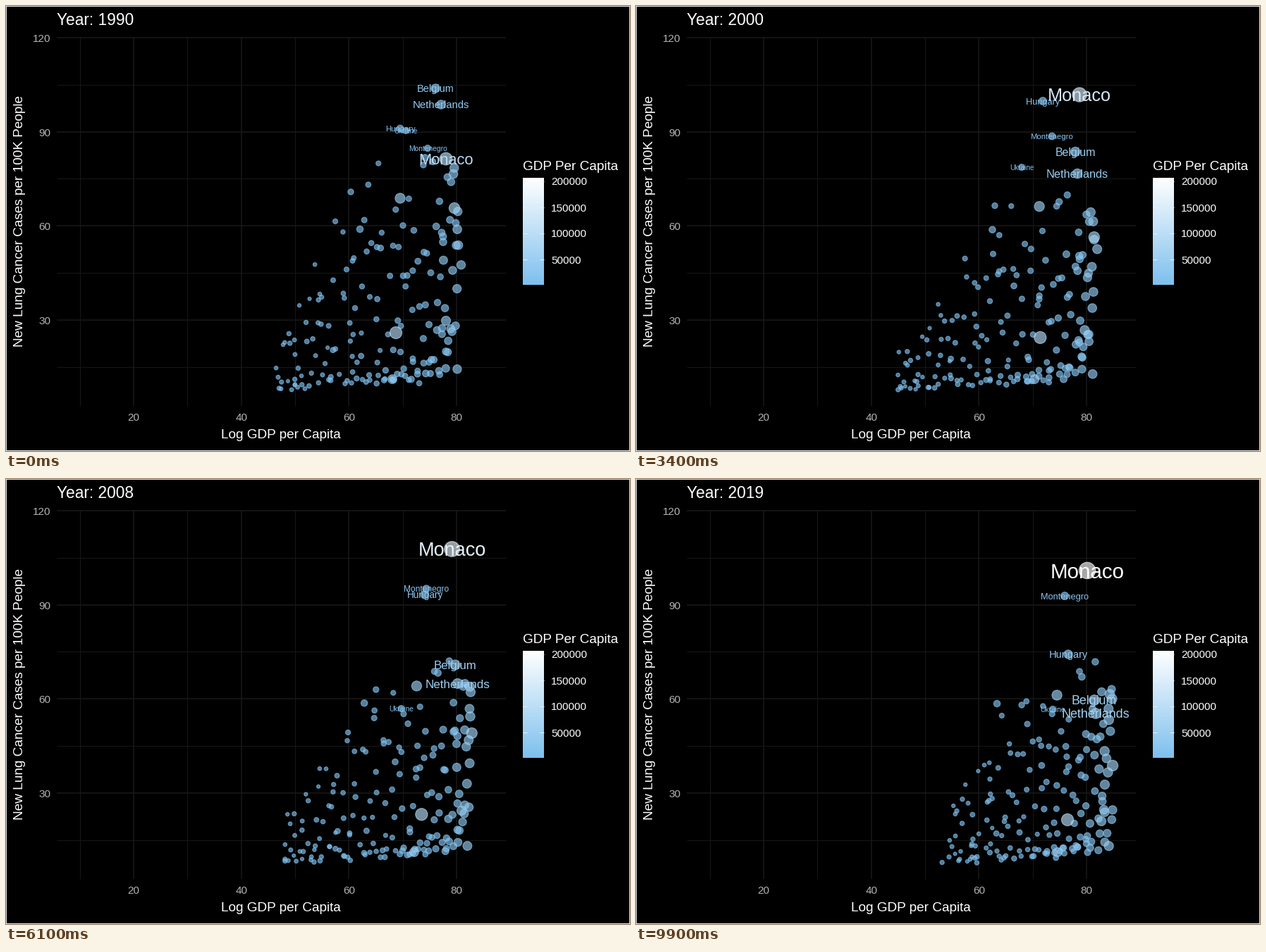
A matplotlib script that plays this animation: 885x632 px, repeating every 10000 ms.

```python
import numpy as np
import matplotlib.pyplot as plt
from matplotlib.animation import FuncAnimation
from matplotlib.patches import Rectangle

W, H, DPI = 885, 632, 100
FRAMES, YEARS, CROWD = 100, 30, 172
PT = 72 / DPI
SKY = np.array([0x7E, 0xC0, 0xEE]) / 255
T = np.arange(FRAMES)
PART = T / (FRAMES - 1)
STATES = np.linspace(0, FRAMES - 1, YEARS)

plt.rcParams["font.family"] = "Liberation Sans"
rng = np.random.default_rng(11)

# Named bubbles: first and last size, then x and y at each key time
KEYS = [0, 20, 34, 49, 73, 99]
LABELS = {
    "Belgium": (2.95, 3.6, [609, 618, 623, 632, 642, 650],
                [117, 170, 207, 255, 273, 314]),
    "Hungary": (2.3, 2.95, [559, 569, 577, 586, 602, 613],
                [174, 150, 135, 135, 194, 249]),
    "Monaco": (4.46, 6, [624, 628, 629, 632, 633, 640],
               [217, 206, 126, 94, 105, 130]),
    "Montenegro": (2.1, 2.6, [598, 593, 590, 592, 600, 608],
                   [202, 191, 185, 145, 167, 166]),
    "Netherlands": (3.02, 3.64, [617, 622, 626, 633, 648, 652],
                    [140, 182, 238, 285, 296, 333]),
    "Ukraine": (2, 2.1, [567, 542, 547, 547, 574, 591],
                [177, 163, 229, 292, 360, 327]),
}

# Bubbles that stand apart: size, first x and y, last x and y
LONERS = [
    (3.5, 559, 273, 597, 307),
    (4.3, 553, 464, 612, 484),
    (3.8, 636, 287, 676, 407),
    (3.2, 624, 447, 660, 486),
    (3.1, 548, 530, 598, 530),
    (1.9, 489, 264, 547, 321),
    (2.2, 502, 317, 512, 319),
]


def wander(step):
    """Random drift, straight from one year to the next."""
    walk = np.cumsum(rng.normal(0, step, YEARS))
    return np.interp(T, STATES, walk - walk.mean())


def crowd():
    """Countries by income rank: richer ones lie further right and reach
    higher rates; the whole fan slides right and flattens over the years."""
    spread = [0, 34, 73, 99]
    left = np.interp(T, spread, [384, 368, 402, 440])
    right = np.interp(T, spread, [640, 650, 663, 674])
    peak = np.interp(T, spread, [165, 235, 235, 250])
    drop = 280 - 95 * PART
    for k in range(CROWD):
        rank = (k + 0.5) / CROWD
        reach = 1 - (1 - rank) ** 1.3
        top = peak + drop * abs(1 - reach / 0.75) ** 1.2
        bottom = 544 - 14 * reach
        level = (k * 0.618 + rng.normal(0, 0.12)) % 1
        level **= 2.2 - 1.6 * rank ** 4
        size = 1.15 + 0.95 * rank + rank ** 6 + rng.normal(0, 0.13)
        x = left + (right - left) * reach + wander(1.4)
        y = bottom + (top - bottom) * level + wander(1 + 2 * level)
        yield x, np.minimum(y, 545), max(size, 1) + 0.3 * rank ** 4 * PART


def build_tracks():
    rows = list(crowd())
    for size, x0, y0, x1, y1 in LONERS:
        rows.append((x0 + (x1 - x0) * PART, y0 + (y1 - y0) * PART,
                     np.full(FRAMES, size)))
    for s0, s1, xs, ys in LABELS.values():
        rows.append((np.interp(T, KEYS, xs), np.interp(T, KEYS, ys),
                     s0 + (s1 - s0) * PART ** 0.75))
    return np.array(rows).transpose(2, 0, 1)


def shade(size):
    """Sky blue to white by GDP, which goes with the square of the size."""
    t = np.clip((np.asarray(size) - 1) / 5, 0, 1)[..., None] ** 2
    return SKY + (1 - SKY) * t


def diameter(size):
    return 3.685 * size + 1.224


def write(x, y, text, px, color="white", **kw):
    return ax.text(x, y, text, fontsize=px * PT, color=color, **kw)


def px_x(v):
    return 181 + (v - 20) * 7.633


def px_y(v):
    return 446 - (v - 30) * 4.456


def rule(xs, ys, width, color):
    ax.plot(xs, ys, color=color, lw=width * PT, zorder=1,
            solid_capstyle="butt")


fig = plt.figure(figsize=(W / DPI, H / DPI), dpi=DPI, facecolor="black")
ax = fig.add_axes([0, 0, 1, 1])
ax.axis("off")

# Grid and axis labels, every second line a major one
for k in range(1, 9):
    major = k % 2 == 0
    width = 1.7 if major else 1
    x, y = px_x(10 * k), px_y(15 * k)
    if x < 709:
        rule([x, x], [44, 568], width, "#171717")
    rule([72, 709], [y, y], width, "#171717")
    if major:
        write(x, 589, str(10 * k), 15.2, "#b3b3b3", ha="center")
        write(63.5, y + 6, str(15 * k), 15.2, "#b3b3b3", ha="right")

write(390, 614, "Log GDP per Capita", 19, ha="center")
write(24.5, 306, "New Lung Cancer Cases per 100K People", 19, ha="center",
      va="baseline", rotation=90, rotation_mode="anchor")
title = write(72, 27, "", 22.8)

# Colour bar
write(733, 233, "GDP Per Capita", 19)
ramp = SKY + (1 - SKY) * np.linspace(1, 0, 152)[:, None]
ax.imshow(ramp[:, None, :], extent=(733, 763, 396, 244), aspect="auto")
for k in range(4):
    y = 249 + 37 * k
    write(773, y + 5.5, str(200000 - 50000 * k), 15.2)
    for x in (733, 757):
        rule([x, x + 6], [y, y], 1, "#e4f2fc")

ax.add_patch(Rectangle((0, 0), W, H, fill=False, ec="white", lw=1.8 * PT))
ax.set_xlim(0, W)
ax.set_ylim(H, 0)

tracks = build_tracks()
dots = ax.scatter(tracks[0, :, 0], tracks[0, :, 1], lw=1.22 * PT, zorder=3)
names = [write(0, 0, n, 10, ha="center", zorder=4) for n in LABELS]


def draw(i):
    x, y, size = tracks[i].T
    rgba = np.column_stack([shade(size), np.full(len(size), 0.65)])
    dots.set_offsets(np.column_stack([x, y]))
    dots.set_sizes((diameter(size) * PT) ** 2)
    dots.set_facecolor(rgba)
    dots.set_edgecolor(rgba)
    for name, (nx, ny, ns) in zip(names, tracks[i, -len(names):]):
        px = ns * 4.913
        name.set_position((nx, ny + 0.36 * px))
        name.set_fontsize(px * PT)
        name.set_color(shade(ns))
    title.set_text(f"Year: {round(1990 + (YEARS - 1) * PART[i])}")
    return [dots, title, *names]


anim = FuncAnimation(fig, draw, frames=FRAMES, interval=100, repeat=True,
                     repeat_delay=0)
plt.show()
```
